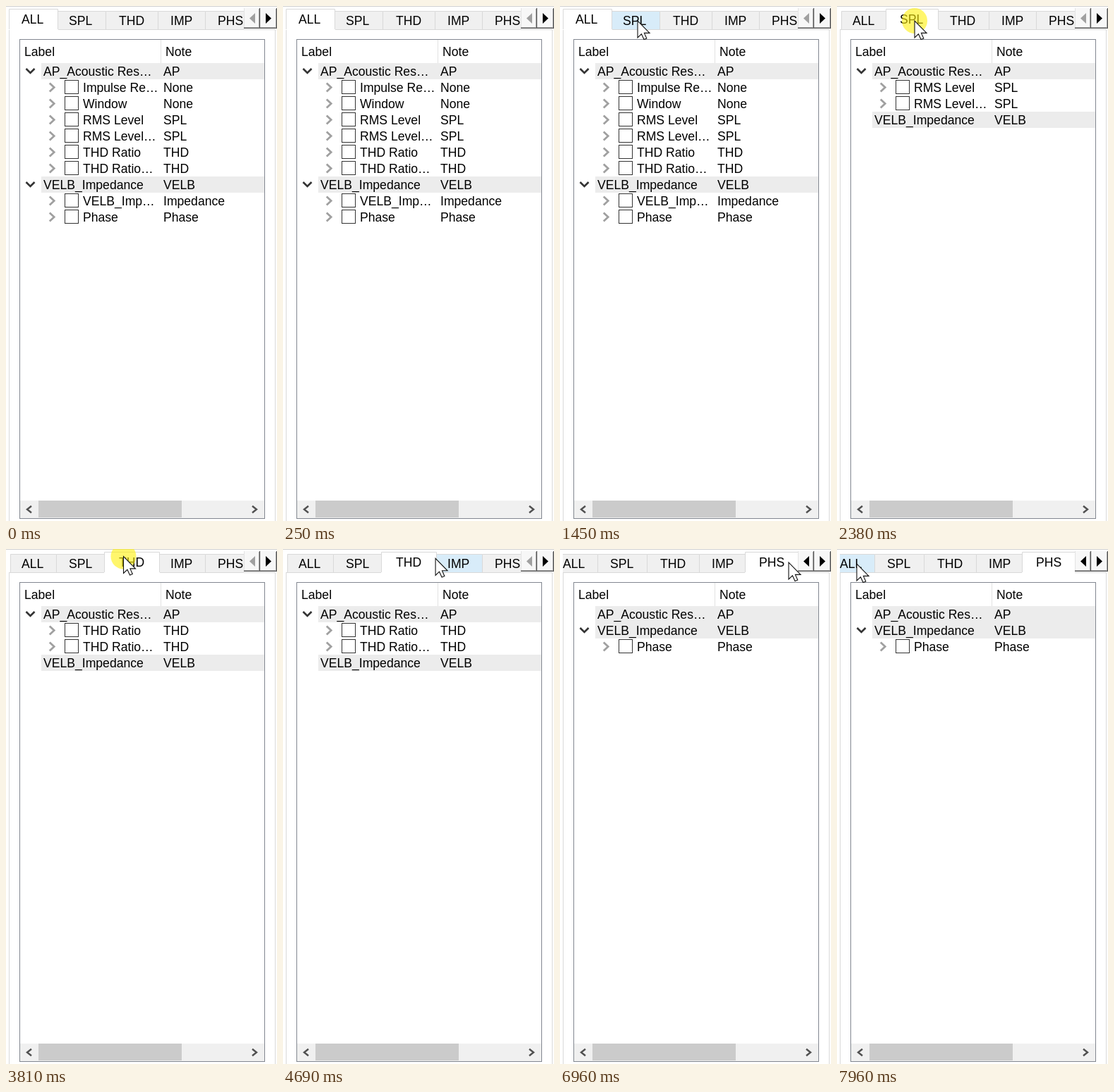
An HTML page with a canvas that plays this animation: 384x731 px, repeating every 8000 ms.

```html
<!DOCTYPE html>
<html lang="en">
<head>
<meta charset="utf-8">
<title>Tabbed curve list</title>
<style>
  html, body { margin: 0; width: 100%; height: 100%; overflow: hidden; background: #fff; }
  canvas { display: block; width: 384px; height: 731px; }
</style>
</head>
<body>
<canvas id="stage"></canvas>
<script>
const W = 384, H = 731, LOOP = 8000;
const canvas = document.getElementById('stage');
const ctx = canvas.getContext('2d');
const dpr = window.devicePixelRatio || 1;
canvas.width = W * dpr;
canvas.height = H * dpr;

const FONT = '17.6px "Liberation Sans", Arial, sans-serif';
const LINE = '#d9d9d9', ROW_H = 23, ROW_TOP = 81;

// name, left, right
const TABS = [
  ['ALL', 6, 71], ['SPL', 71, 141], ['THD', 141, 215], ['IMP', 215, 282], ['PHS', 282, 355]
];
const TEXT_X = [22, 89, 160, 233, 300];

// label, note, tabs besides ALL that show the item
const GROUPS = [
  { label: 'AP_Acoustic Res…', note: 'AP', items: [
    ['Impulse Re…', 'None', ''], ['Window', 'None', ''],
    ['RMS Level', 'SPL', 'SPL'], ['RMS Level…', 'SPL', 'SPL'],
    ['THD Ratio', 'THD', 'THD'], ['THD Ratio…', 'THD', 'THD']
  ] },
  { label: 'VELB_Impedance', note: 'VELB', items: [
    ['VELB_Imp…', 'Impedance', 'IMP'], ['Phase', 'Phase', 'PHS']
  ] }
];

// pointer moves: first step, last step, number of steps, from, to
const MOVES = [
  [790, 1320, 9, [115, -28], [109, 16]],
  [1380, 1450, 2, [109, 16], [110, 21]],
  [3270, 3740, 8, [110, 21], [166.5, 10.5]],
  [4350, 4960, 10, [166.5, 10.5], [243, 15]],
  [6370, 6770, 7, [243, 15], [324, 19]],
  [7230, 7960, 12, [324, 19], [28, 21]]
];

// press, release, tab
const CLICKS = [[2380, 2510, 1], [3810, 3950, 2], [5100, 5250, 3], [6830, 6960, 4]];

const ease = p => p * p * (3 - 2 * p);

function pointerAt(t) {
  let pos = MOVES[0][3];
  for (const [t0, t1, n, a, b] of MOVES) {
    if (t < t0) break;
    const step = Math.min(n, Math.floor((t - t0) / (t1 - t0) * (n - 1) + 1e-6) + 1);
    const p = ease(step / n);
    pos = [a[0] + (b[0] - a[0]) * p, a[1] + (b[1] - a[1]) * p];
  }
  return pos;
}

function box(x, y, w, h, color) {
  ctx.fillStyle = color;
  ctx.fillRect(x, y, w, h);
}

function text(s, x, y) {
  ctx.fillStyle = '#000';
  ctx.fillText(s, x, y);
}

function path(points, close) {
  ctx.beginPath();
  points.forEach(([x, y]) => ctx.lineTo(x, y));
  if (close) ctx.closePath();
}

function chevron(x, y, dx, dy, color, width) {
  const pts = dx ? [[-dx, -6], [dx, 0], [-dx, 6]] : [[-6, -dy], [0, dy], [6, -dy]];
  path(pts.map(([px, py]) => [x + px, y + py * (dx && width < 2.5 ? 0.8 : 1)]));
  ctx.strokeStyle = color;
  ctx.lineWidth = width;
  ctx.stroke();
}

function frameRect(x, y, w, h, color) {
  ctx.strokeStyle = color;
  ctx.lineWidth = 1;
  ctx.strokeRect(x + 0.5, y + 0.5, w - 1, h - 1);
}

function drawTab(i, selected, hovered, shift) {
  const [name, l, r] = TABS[i];
  const grow = selected ? 2 : 0;
  const x = l - shift - grow, w = r - l + 1 + 2 * grow;
  const top = selected ? 4 : 7;
  box(x, top, w, (selected ? 34 : 33) - top, selected ? '#fff' : hovered ? '#d8ecf9' : '#f0f0f0');
  path([[x + 0.5, 33], [x + 0.5, top + 0.5], [x + w - 0.5, top + 0.5], [x + w - 0.5, 33]]);
  ctx.strokeStyle = LINE;
  ctx.lineWidth = 1;
  ctx.stroke();
  text(name, TEXT_X[i] - shift, selected ? 25 : 27);
}

function drawScroller(x, w, dir, color) {
  box(x, 3, w, 29, '#f7f7f7');
  box(x, 3, 1, 29, '#e3e3e3');
  box(x + w - 2, 4, 1, 27, '#a0a0a0');
  box(x, 30, w - 1, 1, '#a0a0a0');
  box(x + w - 1, 3, 1, 29, '#555');
  box(x, 31, w, 1, '#555');
  const cx = x + 12;
  path([[cx - 4 * dir, 10], [cx + 4 * dir, 17.5], [cx - 4 * dir, 25]], true);
  ctx.fillStyle = color;
  ctx.fill();
}

function drawTabs(active, pointer) {
  const shift = active === 4 ? 18 : 0;
  const [px, py] = pointer;
  box(4, 33, 378, 1, LINE);
  ctx.save();
  ctx.beginPath();
  ctx.rect(4, 0, 333, 34);
  ctx.clip();
  TABS.forEach(([, l, r], i) => {
    const hovered = py >= 7 && py < 33 && px >= l - shift && px < r - shift;
    if (i !== active) drawTab(i, false, hovered, shift);
  });
  drawTab(active, true, false, shift);
  ctx.restore();
  drawScroller(337, 23, -1, shift ? '#000' : '#a0a0a0');
  drawScroller(360, 24, 1, '#000');
}

function drawList(active) {
  const tab = TABS[active][0];
  text('Label', 26, 71);
  text('Note', 226, 71);
  box(219, 48, 1, 33, '#e2e2e2');
  let y = ROW_TOP;
  for (const { label, note, items } of GROUPS) {
    const shown = items.filter(it => active === 0 || it[2] === tab);
    box(50, y, 316, ROW_H, '#ececec');
    if (shown.length) chevron(34.5, y + 11, 0, 3, '#333', 2.6);
    text(label, 53, y + 18);
    text(note, 223, y + 18);
    y += ROW_H;
    for (const [name, kind] of shown) {
      chevron(65, y + 11.5, 3.2, 0, '#a0a0a0', 2.8);
      frameRect(83, y + 1, 20, 20, '#333');
      text(name, 109, y + 18);
      text(kind, 223, y + 18);
      y += ROW_H;
    }
  }
  box(20, 702, 346, 25, '#f0f0f0');
  box(46, 702, 203, 24, '#cbcbcb');
  chevron(33, 714.5, -3, 0, '#505050', 2.4);
  chevron(352, 714.5, 3, 0, '#505050', 2.4);
  frameRect(19, 47, 348, 681, '#828790');
}

function drawPointer([x, y], pressed) {
  if (pressed) {
    ctx.beginPath();
    ctx.arc(x, y, 18, 0, 2 * Math.PI);
    ctx.fillStyle = 'rgba(255, 240, 10, 0.6)';
    ctx.fill();
  }
  const arrow = [[0, 0], [0, 24], [5.4, 18.8], [9, 26.6], [12.8, 25], [9.4, 17.4], [17, 17.4]];
  path(arrow.map(([dx, dy]) => [x + dx, y + dy]), true);
  ctx.fillStyle = '#fff';
  ctx.fill();
  ctx.strokeStyle = '#111';
  ctx.lineWidth = 1.1;
  ctx.stroke();
}

function draw(t) {
  const pointer = pointerAt(t);
  const active = CLICKS.reduce((tab, c) => t >= c[0] ? c[2] : tab, 0);
  const pressed = CLICKS.some(([down, up]) => t >= down && t < up);

  ctx.setTransform(dpr, 0, 0, dpr, 0, 0);
  ctx.font = FONT;
  box(0, 0, W, H, '#fff');
  box(0, 0, W, 1, '#d0d0d0');
  box(4, 33, 1, H - 33, LINE);
  box(381, 33, 1, H - 33, LINE);
  drawTabs(active, pointer);
  drawList(active);
  drawPointer(pointer, pressed);
}

const start = performance.now();
function tick() {
  draw((performance.now() - start) % LOOP);
  requestAnimationFrame(tick);
}
tick();
</script>
</body>
</html>
```
